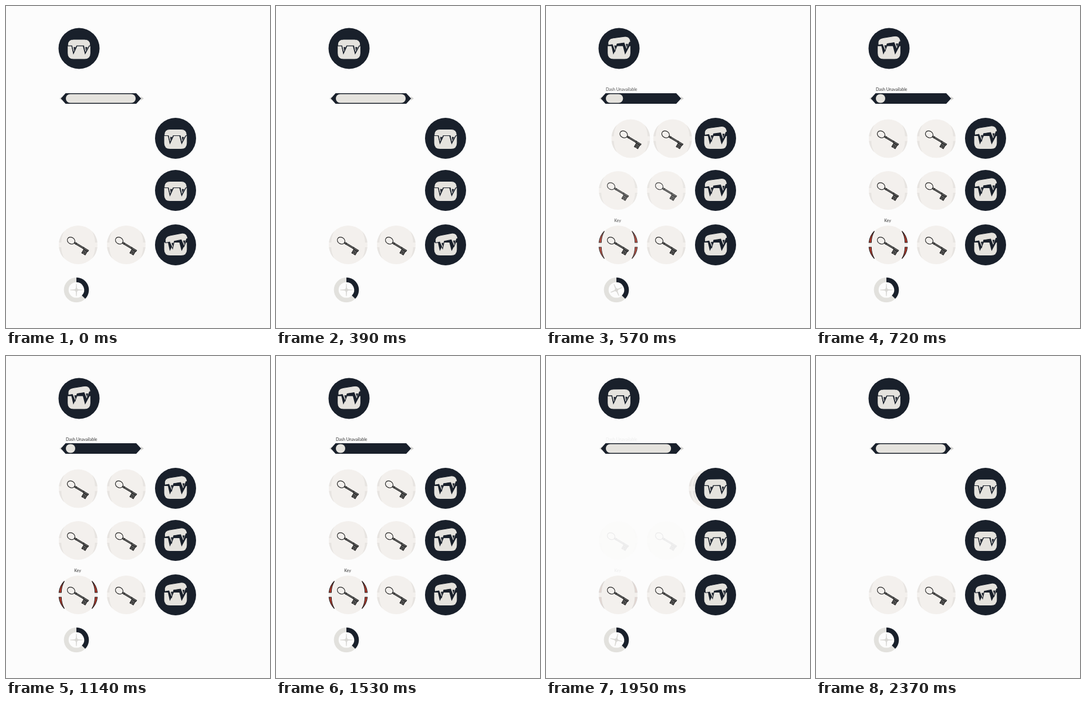
Animation, 450 px wide and 550 px high, one loop 2430 ms. Source, as an HTML page:

```html
<!DOCTYPE html>
<html lang="en">
<head>
<meta charset="utf-8">
<style>
  html, body { margin: 0; width: 100%; height: 100%; overflow: hidden; background: #fcfcfc; }
  svg { display: block; width: 450px; height: 550px; }
  text { font: 7.1px Lato, sans-serif; fill: #333; }
  .dark { fill: #19202b; }
  .cream { fill: #e5e3de; }
</style>
</head>
<body>
<svg viewBox="0 0 450 550">
  <defs>
    <path id="crescent" d="M32.7-4A33 33 0 0 0 23.5-23.5Q28.7-14.5 28.7-4Z"/>
    <g id="ring">
      <use href="#crescent"/>
      <use href="#crescent" transform="scale(-1 1)"/>
      <use href="#crescent" transform="scale(1 -1)"/>
      <use href="#crescent" transform="scale(-1)"/>
    </g>
    <g id="disc">
      <circle r="33" fill="#f3f0ed"/>
      <use href="#ring" fill="#e7e4e1"/>
    </g>
    <g id="key" transform="rotate(31)" fill="none" stroke="#252525" stroke-width="1.1">
      <ellipse cx="-14" rx="6.8" ry="5.6"/>
      <path d="M-7.2-1.1H20V1.1H-7.2ZM-4-2V2M10.5-2V2" fill="#777"/>
      <path d="M12.3 1.5V8.7H14.8V5.5H16.4V8.7H19.2V1.5Z" fill="#555"/>
    </g>
    <g id="body">
      <circle r="35" class="dark"/>
      <path class="cream" d="M-19.3-4H-13L-9.7 10L-3-4H6.5L10 10L18-4H19.3V8Q19.3 18-9.3 18 9.3 18H-9.3Q-19.3 18-19.3 8Z" visibility="hidden"/>
      <path class="cream" d="M-19.3-4H-13L-9.7 10.5L-3-4H6.5L10.3 10.5L18-4H19.3V8Q19.3 18 9.3 18H-9.3Q-19.3 18-19.3 8Z"/>
    </g>
    <g id="lid">
      <path class="cream" stroke="#19202b" stroke-width="1.1"
        d="M-19.3-4.5V-6Q-19.3-15.5-9.3-15.5H9.3Q19.3-15.5 19.3-6V-4.5H17.4L10.6 7.5L8-4.5H-4L-9.3 7.5L-12.2-4.5Z"/>
      <path class="dark" d="M-9.2-2.5L-8.4 4L-5.6-2ZM10.8-2.5L11.6 4L14.6-2Z"/>
    </g>
  </defs>

  <g id="chests"></g>

  <path fill="#d9d8d5" d="M91 158L95 155V161ZM235 158L230 154.5V161.5Z"/>
  <path class="dark" d="M93.5 158L101.5 149H222L230.3 158L222 167H101.5Z"/>
  <rect id="fill" class="cream" x="102" y="150.4" height="15" rx="7.5"/>
  <text id="dash" x="102" y="144.7">Dash Unavailable</text>
  <text id="label" x="122" y="369.3" text-anchor="middle">Key</text>

  <g transform="translate(120 485)" fill="none" stroke-width="8">
    <circle r="17.3" stroke="#e2e1dd"/>
    <path d="M0-17.3A17.3 17.3 0 0 1 12.2 12.2" stroke="#19202b"/>
    <path id="cross" fill="#d9d8d5" d="M-10.5-.6L-3-1-1-3-.6-10.5H.6L1-3 3-1 10.5-.6V.6L3 1 1 3 .6 10.5H-.6L-1 3-3 1-10.5 .6Z"/>
  </g>
</svg>
<script>
const LOOP = 2430, OPEN_AT = 396, CLOSE_AT = 1756, DURATION = 250;
const $ = id => document.getElementById(id);
const svgNS = 'http://www.w3.org/2000/svg';
const move = (el, x, y) => el.setAttribute('transform', `translate(${x} ${y})`);
const mix = (a, b, p) => a + (b - a) * p;

function group(parent, x, y, ...ids) {
  const g = document.createElementNS(svgNS, 'g');
  g.innerHTML = ids.map(id => `<use href="#${id}"/>`).join('');
  move(g, x, y);
  return parent.appendChild(g);
}

const stage = $('chests');
const keyRow = y => [123, 205].map(x => group(stage, x, y, 'disc', 'key'));
const sliding = keyRow(226.5);
const fading = keyRow(315);
keyRow(408);

const redRing = group(stage, 123, 408, 'ring');
redRing.setAttribute('fill', '#bd3a2b');
redRing.setAttribute('stroke', '#2a2020');
redRing.setAttribute('stroke-width', 1.1);

// Resting lid pose: [tilt, x, y]
const closed = [0, 0, 0], ajar = [-11, 1, -2.5], open = [-9, 0, -4.2];
const lids = [[124.5, 72.5, closed], [289, 226, closed], [289, 315, closed], [289, 408, ajar]]
  .map(([x, y, rest]) => {
    const chest = group(stage, x, y, 'body', 'lid');
    return { el: chest.lastChild, rest };
  });

const easeOut = t => 1 - (1 - Math.min(1, Math.max(0, t))) ** 1.7;

function render(now) {
  const t = now % LOOP;
  const p = easeOut((t - OPEN_AT) / DURATION) - easeOut((t - CLOSE_AT) / DURATION);

  sliding.forEach((el, i) => move(el, mix(289, [123, 205][i], p), 226.5));
  for (const el of [...fading, redRing, $('dash'), $('label')]) el.setAttribute('opacity', p);
  for (const { el, rest } of lids) {
    const [tilt, x, y] = rest.map((v, i) => mix(v, open[i], p));
    el.setAttribute('transform', `translate(${x} ${y}) rotate(${tilt} 0 -9)`);
  }
  $('fill').setAttribute('width', mix(119, 16, p));
  $('cross').setAttribute('transform', `rotate(${180 * p})`);
}

const start = performance.now();
function tick() {
  render(performance.now() - start);
  requestAnimationFrame(tick);
}
tick();
</script>
</body>
</html>
```
